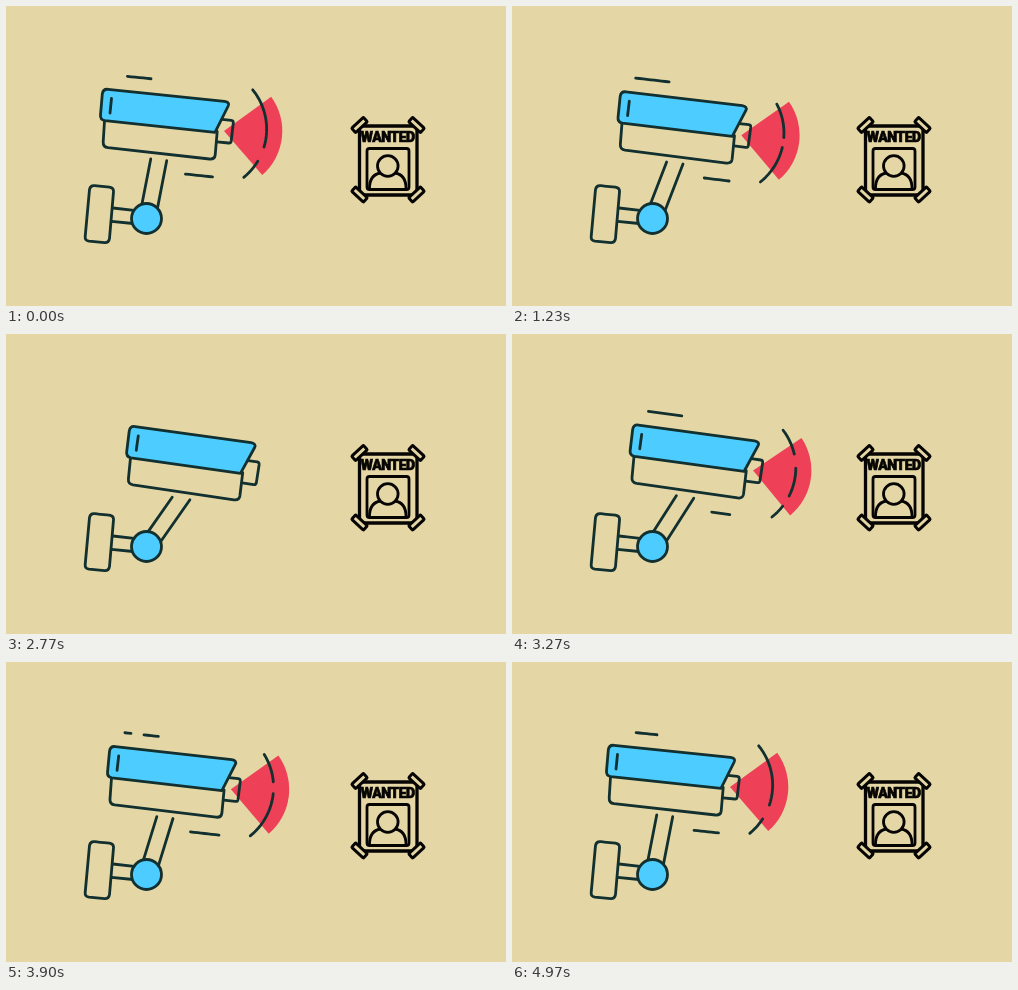
An HTML page for the animation above (5010 ms loop, 500 by 300 pixels).

```html
<!DOCTYPE html>
<html lang="en">
<head>
<meta charset="utf-8">
<title>Security camera</title>
<style>
  html, body { margin: 0; width: 100%; height: 100%; overflow: hidden; background: #e5d7a5; }
  svg { display: block; width: 500px; height: 300px; }
  .ink { fill: none; stroke: #12302f; stroke-width: 2.8; stroke-linecap: round; stroke-linejoin: round; }
  .blue { fill: #4dccff; }
  .paper { fill: none; stroke: #060503; stroke-width: 3.3; stroke-linejoin: round; }
  .tape { fill: #e5d7a5; stroke-width: 3; }
  text { font: 900 14px Roboto, sans-serif; letter-spacing: -.5px; fill: #060503; stroke: #060503; stroke-width: .7; text-anchor: middle; }
</style>
</head>
<body>
<svg viewBox="0 0 500 300">
  <g class="paper">
    <rect x="353.5" y="120" width="57.5" height="69"/>
    <g stroke-width="2.8">
      <rect x="361" y="142.500" width="42" height="41" rx="2.500"/>
      <path d="M363.500 182.500C363.500 173 368 168 374.500 167M389 167C395.500 168 400 173 400 182.500"/>
      <circle cx="381.800" cy="160" r="10.300"/>
    </g>
    <g id="tapes"></g>
  </g>
  <text x="381.700" y="136">WANTED</text>

  <g class="ink">
    <path d="M88.500 179.700L103.500 181.200Q107.900 182 107.500 186L103.500 232.500Q102.800 237 98.500 236.700L83 235.200Q78.800 234.500 79.200 230.500L83.500 183.500Q84.300 179.300 88.500 179.700Z"/>
    <path d="M107 202L128 204.300M105.500 215.300L127 217.500"/>
    <path id="arm"/>
    <circle class="blue" cx="140.500" cy="212.500" r="15"/>
    <g id="cam">
      <path id="fan" fill="#ee4057" stroke="none"/>
      <path d="M216 113.300L225.300 114.300Q227.500 114.600 227.300 117L225.200 135Q224.800 137.300 222.500 137L211 135.800"/>
      <path d="M98.500 115L97.200 136Q97 141 102 141.700L203.500 153Q208.700 153.400 209.200 149L211.200 125.500"/>
      <path class="blue" d="M102 83.300L218.500 95.300Q224 96.300 222.200 100L209 126.300L99 114.700Q94 113.800 94.500 109L96.300 88Q97 82.800 102 83.300Z"/>
      <path d="M105.500 92.500L104 107"/>
      <path id="signals"/>
    </g>
  </g>
</svg>
<script>
const LOOP = 5010, RAD = Math.PI / 180;
const BALL = { x: 140.5, y: 212.5 };
const PIVOT = { x: 110, y: 100 };
const $ = id => document.getElementById(id);
const draw = (id, d) => $(id).setAttribute('d', d);
const pt = (x, y) => `${x.toFixed(2)} ${y.toFixed(2)}`;

const ease = (t, from, to) => {
  const p = Math.min(1, Math.max(0, (t - from) / (to - from)));
  return (1 - Math.cos(Math.PI * p)) / 2;
};

$('tapes').innerHTML = [[353.5, 119, -43], [410.5, 119, 43], [353.5, 188.5, 43], [410.5, 188.5, -43]]
  .map(([x, y, a]) => `<rect class="tape" x="-8" y="-3" width="16" height="6" rx="1" transform="translate(${x} ${y}) rotate(${a})"/>`)
  .join('');

// Evenly spaced gaps as [start, width]
const every = (start, step, width) =>
  Array.from({ length: 7 }, (_, i) => [start + (i - 3) * step, width]);

const line = (x, y, slope) => s => [x + s, y + s * slope];
const arc = s => {
  const a = (s / 1.088 - 40) * RAD;
  return [198.3 + 62.35 * Math.cos(a), 123.1 + 62.35 * Math.sin(a)];
};

const signals = [
  { at: line(110.5, 69.3, .1), len: 35.5, speed: .067, gaps: every(-1, 65.2, 11) },
  { at: line(177, 167.8, .105), len: 30.5, speed: .0645, gaps: every(-10.5, 81.5, 12) },
  { at: arc, len: 99.7, speed: .0527, gaps: [[-63, 12], [-20, 10], [62.8, 13.5], [113, 8]] }
];

// Visible pieces of a stroke after its drifting gaps are cut out
function pieces({ at, len, speed, gaps }, time, open) {
  const end = len * open;
  let from = 0, d = '';
  const add = (a, b) => {
    a += 1; b -= 1;
    if (b <= a) return;
    const n = Math.ceil((b - a) / 4);
    for (let i = 0; i <= n; i++) d += (i ? 'L' : 'M') + pt(...at(a + (b - a) * i / n));
  };
  for (const [start, width] of gaps) {
    const g = start - speed * time;
    if (g + width < 0 || g > end) continue;
    add(from, g);
    from = g + width;
  }
  add(from, end);
  return d;
}

function armPath(turn, tilt, dx, dy) {
  const a = (11 + turn) * RAD, sin = Math.sin(a), cos = Math.cos(a);
  // The arm ends on a line just below the tilted camera body
  const b = tilt * RAD, slope = Math.tan(6.2 * RAD + b);
  const ex = PIVOT.x + dx + 35 * Math.cos(b) - 53 * Math.sin(b);
  const ey = PIVOT.y + dy + 35 * Math.sin(b) + 53 * Math.cos(b);
  return [-7.2, 8.8].map(k => {
    const x = BALL.x + k * cos, y = BALL.y + k * sin;
    const s = (y - ey - slope * (x - ex)) / (cos + slope * sin);
    return `M${pt(x + 11 * sin, y - 11 * cos)}L${pt(x + s * sin, y - s * cos)}`;
  }).join('');
}

function fanPath(open) {
  if (open < .005) return '';
  const r = 58.3, half = 42.5 * open;
  const tip = a => pt(218 + r * Math.cos(a * RAD), 125 + r * Math.sin(a * RAD));
  return `M218 125L${tip(6.5 - half)}A${r} ${r} 0 0 1 ${tip(6.5 + half)}Z`;
}

function render(t) {
  const turn = 24 * (ease(t, 690, 1890) - ease(t, 2980, 4370));
  const tilt = turn * .086;
  const a0 = 7.7 * RAD, a = a0 + turn * RAD, R = 67.7;
  const dx = R * (Math.sin(a) - Math.sin(a0)), dy = R * (Math.cos(a0) - Math.cos(a));
  const open = 1 - ease(t, 1500, 2030) + ease(t, 2770, 3300);
  const drift = t < 2400 ? t : t - LOOP;

  $('cam').setAttribute('transform',
    `translate(${pt(dx, dy)}) rotate(${tilt.toFixed(3)} ${PIVOT.x} ${PIVOT.y})`);
  draw('arm', armPath(turn, tilt, dx, dy));
  draw('fan', fanPath(open));
  draw('signals', signals
    .map(s => pieces(s, drift, s.at === arc ? open : Math.min(1, open / .7)))
    .join(''));
}

const begin = performance.now();
function tick() {
  render((performance.now() - begin) % LOOP);
  requestAnimationFrame(tick);
}
render(0);
requestAnimationFrame(tick);
</script>
</body>
</html>
```
